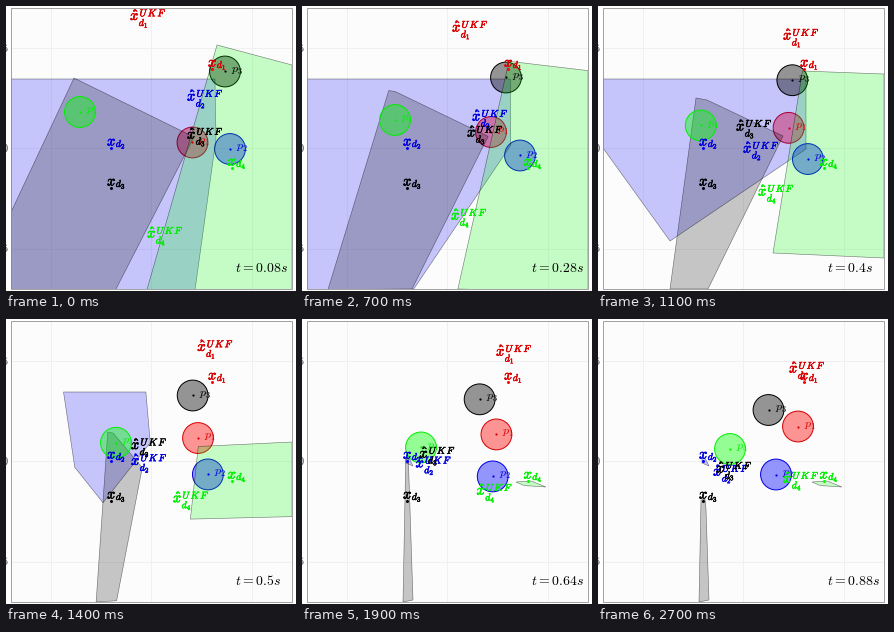
Recreate the animation shown at these times as a matplotlib script. Size 290x285 px, loop 2800 ms.

```python
import numpy as np
import matplotlib.pyplot as plt
import matplotlib.patheffects as pe
from matplotlib.animation import FuncAnimation
from matplotlib.colors import to_rgba
from matplotlib.patches import Circle, Polygon, Rectangle

W, H = 290, 285
FRAMES, INTERVAL = 28, 100
PT = 0.72  # points per pixel at 100 dpi
LEFT, RIGHT, TOP, BOTTOM = 5, 286, 1.5, 283
T0, T1 = 0.08, 0.88

plt.rcParams["mathtext.fontset"] = "cm"

FILLS = ["#ff0000", "#0000ff", "#000000", "#00ff00"]
INKS = ["#d80000", "#0000e0", "#000000", "#00f000"]
GOALS = [(206, 63), (105, 142), (105, 182), (225.5, 162)]

# each robot follows a cubic through four waypoints
ROBOT_AT = [0, 0.25, 0.6, 1]
ROBOTS = [
    [(186.5, 136.5), (189, 126), (193, 117.5), (200, 107.5)],
    [(224, 143), (218, 149.5), (197, 156.5), (178, 155.5)],
    [(219, 65.5), (204, 71.5), (182.5, 78), (170.5, 91)],
    [(74, 106), (93, 114), (114, 126), (132, 130)],
]
PATHS = [np.polyfit(ROBOT_AT, points, 3) for points in ROBOTS]

# estimates wander between a few points: left edge and middle of the symbol
GUESS_AT = [0.16, 0.28, 0.40, 0.56, T1]
GUESSES = [
    [(124, 10.5), (150, 22), (185, 30), (195, 27.5), (191, 50)],
    [(181, 91), (170, 111), (145, 143), (113, 142), (115, 153)],
    [(181, 129), (165, 127), (138, 121), (117, 130), (118, 150)],
    [(141, 228), (149, 210), (160, 186), (171, 176), (185, 160)],
]

# zones: wide open, narrowed, sliver, remnant; corners outside the axes are clipped
ZONES = {
    1: ([T0, 0.40, 0.56, 0.64], [
        [(5, 73), (209, 73), (210, 133), (178, 363), (5, 520)],
        [(5, 73), (208, 73), (208, 143), (72, 235), (5, 142)],
        [(89, 73), (99, 73), (106, 112), (112, 153), (107, 152)],
        [(104, 139), (107, 139), (109, 143), (111, 147), (104, 144)]]),
    2: ([T0, 0.40, 0.56, T1], [
        [(68, 72), (68, 72), (188, 131), (110, 283), (-86, 400)],
        [(98, 92), (109, 94), (185, 130), (110, 283), (72, 283)],
        [(104, 126), (106, 126), (107, 160), (111, 281), (101, 283)],
        [(103, 181), (107, 180), (108, 190), (111, 281), (101, 283)]]),
    3: ([T0, 0.40, 0.56, 0.64], [
        [(211, 39), (286, 59), (286, 343), (124, 343)],
        [(204.5, 65), (286, 68), (286, 252), (175, 247)],
        [(185, 165), (286, 156), (286, 165), (190, 172)],
        [(214, 163), (229, 162), (244, 168), (222, 166.5)]]),
}


def blend(times, keys, t):
    """Straight-line blend between neighbouring keys (points or shapes)."""
    keys = np.asarray(keys, float)
    pos = np.interp(t, times, range(len(times)))
    i = min(int(pos), len(times) - 2)
    return keys[i] + (keys[i + 1] - keys[i]) * (pos - i)


def on_path(coeffs, u):
    return u ** np.arange(3, -1, -1) @ coeffs


fig = plt.figure(figsize=(2.9, 2.85), dpi=100, facecolor="white")
ax = fig.add_axes([0, 0, 1, 1])
ax.set(xlim=(0, W), ylim=(H, 0))
ax.axis("off")

size = (RIGHT - LEFT, BOTTOM - TOP)
ax.add_patch(Rectangle((LEFT, TOP), *size, fc="#fcfcfc", ec="none", zorder=0))
border = ax.add_patch(Rectangle((LEFT, TOP), *size, fc="none", ec="#8c8c8c", lw=0.8 * PT, zorder=8))
for i, digit in enumerate("505"):
    gx, gy = 45 + 100.3 * i, 42 + 100.4 * i
    ax.plot([gx, gx], [TOP, BOTTOM], color="#f0f0f0", lw=PT, zorder=0.5)
    ax.plot([LEFT, RIGHT], [gy, gy], color="#f0f0f0", lw=PT, zorder=0.5)
    ax.text(2.5, gy + 3.5, f"${digit}$", size=10 * PT, color="#262626", ha="right", va="baseline")


def math_text(s, px, color, bold=0):
    txt = ax.text(0, 0, f"${s}$", size=px * PT, color=color, ha="left", va="baseline", zorder=10)
    if bold:
        txt.set_path_effects([pe.withStroke(linewidth=bold * PT, foreground=color)])
    return txt


def dot(color, px):
    return ax.plot([0], [0], "o", ms=px * PT, mfc=color, mec="none", zorder=9)[0]


class Label:
    """Bold vector symbol with its index, optionally hatted with a superscript."""

    def __init__(self, i, hat=False):
        ink = INKS[i]
        self.parts = [
            (math_text(r"\hat{x}" if hat else "x", 14.7, ink, 0.55), 0, 3.5),
            (math_text(f"d_{i + 1}", 10, ink, 0.45), 8.7, 9.5 if hat else 5),
        ]
        if hat:
            sup = r"U\hspace{0.17}K\hspace{0.17}F"
            self.parts.append((math_text(sup, 9.8, ink, 0.5), 9.5, -0.2))

    def move(self, x, y):
        for txt, dx, dy in self.parts:
            txt.set_position((x + dx, y + dy))


class Robot:
    """Disc with its name, visible zone, goal and moving estimate."""

    def __init__(self, i):
        self.i = i
        ink, fill = INKS[i], FILLS[i]
        self.disc = ax.add_patch(Circle((0, 0), 15.4, fc=to_rgba(fill, 0.41), ec=ink,
                                        lw=PT, zorder=1 + i))
        self.zone = None
        if i in ZONES:
            self.zone = ax.add_patch(Polygon(np.zeros((4, 2)), lw=0.6 * PT, ec=(0, 0, 0, 0.5),
                                             fc=to_rgba(fill, 0.215), zorder=1.5 + i))
            self.zone.set_clip_path(border)
        self.centre = dot(ink, 2.2)
        self.name = math_text(f"p_{i + 1}", 12, ink)
        self.guess = Label(i, hat=True)
        self.mark = dot(ink, 2.4)
        gx, gy = GOALS[i]
        Label(i).move(gx - 4, gy - 6)
        dot(fill, 3).set_data([gx], [gy])

    def update(self, t):
        x, y = on_path(PATHS[self.i], (t - T0) / (T1 - T0))
        self.disc.center = x, y
        self.centre.set_data([x], [y])
        self.name.set_position((x + 6, y + 1))
        gx, gy = blend(GUESS_AT, GUESSES[self.i], t)
        self.guess.move(gx, gy)
        self.mark.set_data([gx + 4], [gy - 7])
        if self.zone:
            self.zone.set_xy(blend(*ZONES[self.i], t))


robots = [Robot(i) for i in range(4)]
clock = math_text("t", 13.8, "black")
clock.set_position((229, 266.5))


def update(k):
    # the clock ticks in steps of 0.02 s, sampled at the frame rate
    t = 0.02 * int((0.0875 + k * 0.8 / 27) / 0.02)
    for robot in robots:
        robot.update(t)
    clock.set_text(f"$t = {t:.2g}s$")
    return []


anim = FuncAnimation(fig, update, frames=FRAMES, interval=INTERVAL, repeat=True,
                     repeat_delay=0, init_func=lambda: update(0), blit=False)
plt.show()
```
